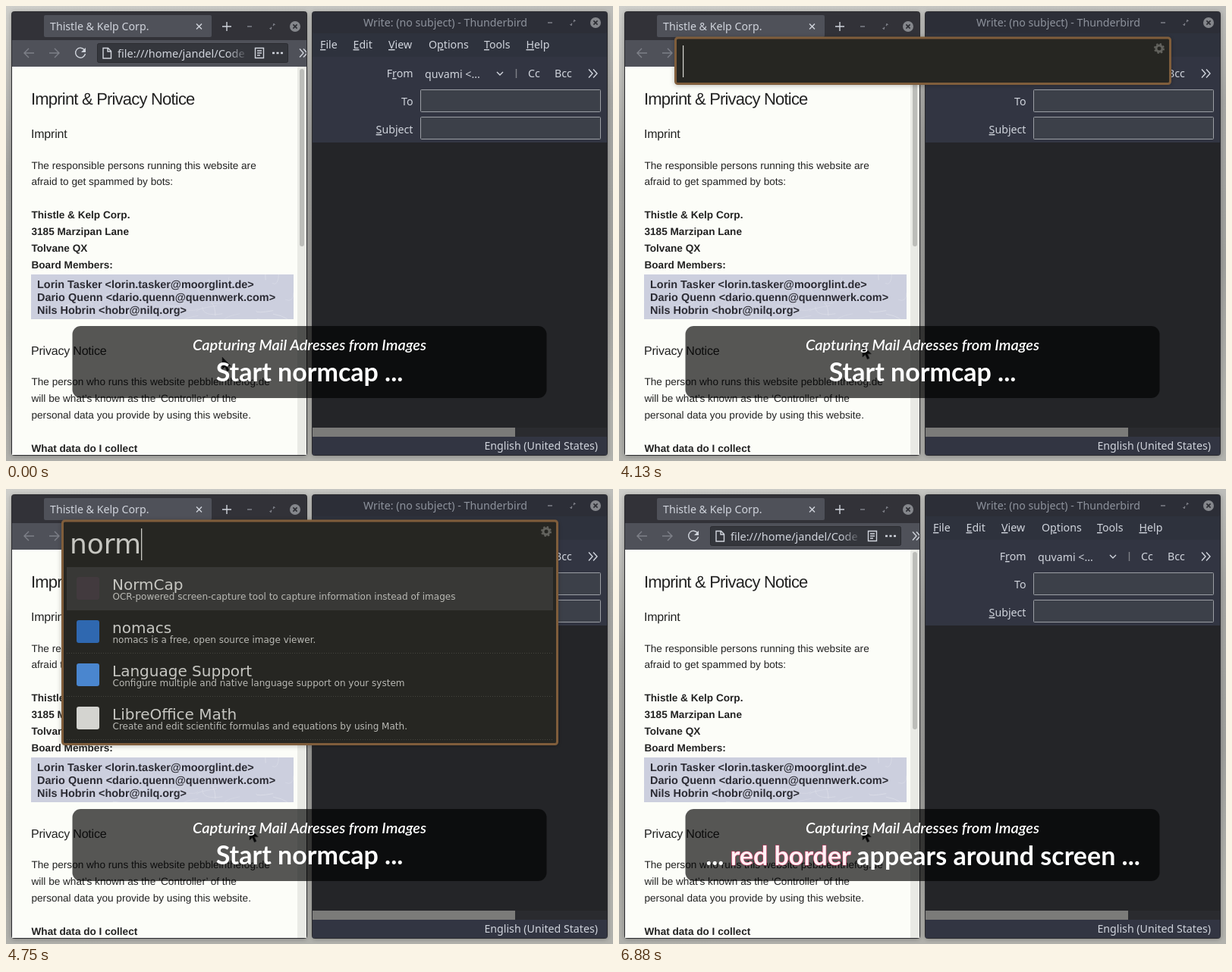
Animation, 800 px wide and 600 px high, one loop 8 s. Source, as an HTML page:

```html
<!DOCTYPE html>
<html lang="en">
<head>
<meta charset="utf-8">
<title>Screen capture demo</title>
<style>
  html, body { margin: 0; width: 100%; height: 100%; overflow: hidden; background: #a9a9a5; }
  svg { display: block; width: 800px; height: 600px; }
  text { white-space: pre; }
  .ui { font: 14.2px "Noto Sans", "Open Sans", sans-serif; fill: #d0d4dc; }
  .page, .scan { font: 13.6px "Liberation Sans", Arial, sans-serif; text-rendering: geometricPrecision; fill: #222; }
  .bold { font-weight: 700; }
  .head { font-size: 16px; letter-spacing: -.2px; }
  .title { font-size: 22px; letter-spacing: -.8px; }
  .scan { font-weight: 700; font-size: 14.45px; fill: #2b2b33; }
  .caption { font-family: Lato, sans-serif; fill: #fff; text-anchor: middle; }
  .small { font-size: 19.9px; font-style: italic; font-weight: 600; }
  .big { font-size: 34px; font-weight: 700; }
  .red { fill: #fff0f4; stroke: #d8426c; stroke-width: 1.2px; paint-order: stroke; }
  .launch { font-family: "DejaVu Sans", Verdana, sans-serif; fill: #c6c6c1; }
  .query { font-size: 36px; }
  .name { font-size: 20px; }
  .info { font-size: 12px; fill: #b9b9b4; }
  .key { text-decoration: underline; }
  .end { text-anchor: end; }
  .line { fill: none; stroke: #d0d4dc; stroke-width: 1.4; }
  .dim { stroke: #7e8088; }
  .window { stroke: #2a2b2e; filter: url(#shadow); }
</style>
</head>
<body>
<svg viewBox="0 0 800 600">
  <defs>
    <linearGradient id="wall" x2=".15" y2="1">
      <stop offset="0" stop-color="#cfcfcb"/><stop offset=".35" stop-color="#a6a6a3"/>
      <stop offset=".7" stop-color="#a0a09d"/><stop offset="1" stop-color="#b2b2ad"/>
    </linearGradient>
    <linearGradient id="fade">
      <stop offset="0" stop-color="#34363c" stop-opacity="0"/><stop offset="1" stop-color="#34363c"/>
    </linearGradient>
    <filter id="shadow" x="-10%" y="-20%" width="120%" height="140%">
      <feDropShadow dx="0" dy="1" stdDeviation="3" flood-opacity=".25"/>
    </filter>
    <clipPath id="browserClip"><rect x="8" y="8" width="388" height="584"/></clipPath>
    <clipPath id="scanClip"><rect x="33" y="354" width="346" height="59"/></clipPath>
    <g id="buttons">
      <path class="line dim" d="M-63 0h6M-33 3v-1M-33 3h2M-27 -3v1M-27 -3h-2M-32 2l1 -1M-28 -2l-1 1"/>
      <circle r="7" fill="#85878c"/>
      <path d="M-2.6 -2.6l5.2 5.2M2.6 -2.6l-5.2 5.2" stroke="#2c2d33" stroke-width="1.6"/>
    </g>
  </defs>

  <rect width="800" height="600" fill="url(#wall)"/>

  <!-- browser -->
  <rect class="window" x="7.5" y="7.5" width="389" height="585" rx="3" fill="#303137"/>
  <g clip-path="url(#browserClip)">
    <rect x="50" y="12" width="221" height="29" rx="2" fill="#4f5159"/>
    <text class="ui" x="58" y="32">Thistle &amp; Kelp Corp.</text>
    <path class="line" d="M251 23.5l7 7M258 23.5l-7 7M285 27h12M291 21v12"/>
    <use href="#buttons" x="381" y="27"/>
    <rect x="8" y="45" width="388" height="35" fill="#4f5159"/>
    <path class="line dim" d="M37 62H24m6 -6l-6 6l6 6M57 62h13m-6 -6l6 6l-6 6"/>
    <path class="line" d="M103.5 58a6.5 6.5 0 1 0 1 5"/>
    <path d="M105 55v6h-6z" fill="#d0d4dc"/>
    <rect x="120.5" y="49.5" width="251" height="25" rx="2" fill="#34363c" stroke="#2a2b30"/>
    <path class="line" d="M128 55.5h6.5l4 4v9.5h-10.5zM134 55.5v4.5h4.5"/>
    <text class="ui" x="147" y="68" style="font-size:14.5px">file:///home/jandel/Code</text>
    <path d="M320 52h8v20h-8z" fill="#34363c"/>
    <rect x="292" y="52" width="28" height="20" fill="url(#fade)"/>
    <path class="line" d="M328.5 55.5h11v13h-11zM331 59h6M331 62h6M331 65h4"/>
    <path d="M351 62h3M356.5 62h3M362 62h3" stroke="#d0d4dc" stroke-width="2.6"/>
    <path class="line" d="M387 56.5l5 5.5l-5 5.5M392 56.5l5 5.5l-5 5.5"/>
    <rect x="8" y="80" width="388" height="512" fill="#fcfdf8"/>
    <rect x="384" y="80" width="12" height="512" fill="#e9eae5"/>
    <rect x="387" y="83" width="6" height="234" rx="3" fill="#bcbdb9"/>
    <g class="page">
      <text class="title" x="33" y="130">Imprint &amp; Privacy Notice</text>
      <text class="head" x="33" y="173.5">Imprint</text>
      <text x="33.5" y="214.5">The responsible persons running this website are</text>
      <text x="33.5" y="236">afraid to get spammed by bots:</text>
      <g class="bold">
        <text x="33.5" y="280">Thistle &amp; Kelp Corp.</text>
        <text x="33.5" y="302">3185 Marzipan Lane</text>
        <text x="33.5" y="324">Tolvane QX</text>
        <text x="33.5" y="346">Board Members:</text>
        <text x="33.5" y="588">What data do I collect</text>
      </g>
      <text class="head" x="33" y="459.5">Privacy Notice</text>
      <text x="33.5" y="500">The person who runs this website pebbleinthefog.de</text>
      <text x="33.5" y="522">will be what’s known as the ‘Controller’ of the</text>
      <text x="33.5" y="544">personal data you provide by using this website.</text>
    </g>
    <rect x="33" y="354" width="346" height="59" fill="#cccfde"/>
    <g id="scratches" clip-path="url(#scanClip)" stroke="#e2e4ec" fill="none"></g>
    <text class="scan" x="41" y="372">Lorin Tasker &lt;lorin.tasker@moorglint.de&gt;</text>
    <text class="scan" x="41" y="389">Dario Quenn &lt;dario.quenn@quennwerk.com&gt;</text>
    <text class="scan" x="41" y="406">Nils Hobrin &lt;hobr@nilq.org&gt;</text>
  </g>

  <!-- mail window -->
  <rect class="window" x="403.5" y="7.5" width="389" height="585" rx="3" fill="#2f323d"/>
  <rect x="404" y="8" width="388" height="28" rx="3" fill="#2c2e37"/>
  <use href="#buttons" x="777" y="22"/>
  <rect x="404" y="67" width="388" height="113" fill="#323542"/>
  <rect x="404" y="180" width="388" height="376" fill="#242528"/>
  <rect x="404" y="556" width="388" height="12" fill="#2a2b2f"/>
  <rect x="404" y="556" width="267" height="12" fill="#7b7b79"/>
  <rect x="404" y="568" width="388" height="24" fill="#323542"/>
  <g fill="#3c4049" stroke="#9b9ea4">
    <rect x="546.5" y="110.5" width="237" height="29" rx="1"/>
    <rect x="546.5" y="146.5" width="237" height="29" rx="1"/>
  </g>
  <g class="ui">
    <text x="471" y="27" fill="#8d929c">Write: (no subject) - Thunderbird</text>
    <text x="414" y="56"><tspan class="key">F</tspan>ile</text>
    <text x="457.5" y="56"><tspan class="key">E</tspan>dit</text>
    <text x="504" y="56"><tspan class="key">V</tspan>iew</text>
    <text x="557" y="56">O<tspan class="key">p</tspan>tions</text>
    <text x="630" y="56"><tspan class="key">T</tspan>ools</text>
    <text x="685.5" y="56"><tspan class="key">H</tspan>elp</text>
    <text class="end" x="536.5" y="94">F<tspan class="key">r</tspan>om</text>
    <text class="end" x="536.5" y="131">To</text>
    <text class="end" x="536.5" y="168"><tspan class="key">S</tspan>ubject</text>
    <text x="552" y="95">quvami &lt;...</text>
    <text x="688" y="94">Cc</text>
    <text x="723" y="94">Bcc</text>
    <text class="end" x="780" y="585">English (United States)</text>
  </g>
  <path class="line" d="M647 87l4 4l4 -4"/>
  <path class="line dim" d="M672.5 83v12"/>
  <path class="line" d="M768 83.5l5 5.5l-5 5.5M774 83.5l5 5.5l-5 5.5"/>

  <path id="pointer" d="M0 0V16l3.7 -3.3l2.6 6l2.7 -1.2l-2.6 -5.7h5z" fill="#151515" stroke="#55565a" stroke-width=".6"/>

  <!-- caption -->
  <rect x="87.5" y="422" width="625" height="95" rx="11" fill="#000" fill-opacity=".66"/>
  <text class="caption small" x="400" y="454">Capturing Mail Adresses from Images</text>
  <text class="caption big" id="start" x="400" y="495">Start normcap ...</text>
  <text class="caption big" id="border" x="400.5" y="496">... <tspan class="red">red border</tspan> appears around screen ...</text>

  <!-- launcher -->
  <g id="launcher">
    <rect id="panel" x="74.5" y="42" width="652" rx="3" fill="#272723" stroke="#7f5d3b" stroke-width="3" filter="url(#shadow)"/>
    <g fill="none" stroke="#62625d">
      <circle cx="712" cy="56" r="4" stroke-width="3"/>
      <circle cx="712" cy="56" r="6" stroke-width="2" stroke-dasharray="2.36"/>
    </g>
    <g id="rows"></g>
    <text class="launch query" id="query" x="84" y="85"></text>
    <rect id="caret" y="52" width="1.2" height="42" fill="#d8d8d2"/>
  </g>
</svg>
<script>
const LOOP = 8000;
const el = id => document.getElementById(id);

function add(parent, tag, attrs, text = "") {
  const node = document.createElementNS("http://www.w3.org/2000/svg", tag);
  for (const key in attrs) node.setAttribute(key, attrs[key]);
  node.textContent = text;
  return parent.appendChild(node);
}

// faint paper scratches, seeded
let seed = 7;
const random = () => (seed = seed * 16807 % 2147483647) / 2147483647;
for (let i = 0; i < 40; i++) {
  const x = 33 + random() * 346, y = 354 + random() * 59;
  const dx = random() * 60 - 30, dy = random() * 40 - 20;
  add(el("scratches"), "path", { d: `M${x} ${y}q${dx} 4 ${dx} ${dy}`, opacity: .25 + random() * .4 });
}

const apps = [
  ["NormCap", "OCR-powered screen-capture tool to capture information instead of images", "#423a3e"],
  ["nomacs", "nomacs is a free, open source image viewer.", "#2f68b0"],
  ["Language Support", "Configure multiple and native language support on your system", "#4a86cf"],
  ["LibreOffice Math", "Create and edit scientific formulas and equations by using Math.", "#d4d4d0"]
];
const ROW = 57;
const rows = apps.map(([name, info, color], i) => {
  const row = add(el("rows"), "g", { transform: `translate(0 ${103 + i * ROW})` });
  if (i === 0) add(row, "rect", { x: 80, width: 641, height: ROW, fill: "#383836" });
  else add(row, "path", { d: "M80 56.5H721", stroke: "#45453f", "stroke-dasharray": "1 2" });
  add(row, "rect", { x: 93, y: 13, width: 30, height: 30, rx: 3, fill: color });
  add(row, "text", { class: "launch name", x: 140, y: 30 }, name);
  add(row, "text", { class: "launch info", x: 140.5, y: 43 }, info);
  return row;
});

// each step: start time, value
const pointerSteps = [[0, [285, 463]], [130, [309, 453]], [250, [321, 447]]];
const opacitySteps = [[0, 0], [2250, .5], [2380, 1], [6500, .6], [6630, .2], [6750, 0]];
const querySteps = [[0, ""], [4250, "n"], [4380, "no"], [4500, "nor"], [4630, "norm"],
  [4880, "normc"], [5130, "normca"], [5380, "normcap"]];
const countSteps = [[0, 0], [4250, 2], [4500, 4], [4880, 1]];
const caretSteps = [[0, 1], [3130, 0], [3500, 1]];
const captionSteps = [[0, "start"], [6130, "border"]];

const at = (steps, t) => steps.findLast(([start]) => start <= t)[1];
const show = (node, on) => node.setAttribute("visibility", on ? "inherit" : "hidden");

function draw(t) {
  el("pointer").setAttribute("transform", `translate(${at(pointerSteps, t)})`);

  const caption = at(captionSteps, t);
  for (const id of ["start", "border"]) show(el(id), id === caption);

  const count = at(countSteps, t);
  rows.forEach((row, i) => show(row, i < count));
  el("panel").setAttribute("height", count ? 66.5 + count * ROW : 60.5);

  const query = el("query");
  query.textContent = at(querySteps, t);
  el("caret").setAttribute("x", 84 + query.getComputedTextLength());
  show(el("caret"), at(caretSteps, t));
  el("launcher").setAttribute("opacity", at(opacitySteps, t));
}

function tick() {
  draw(performance.now() % LOOP);
  requestAnimationFrame(tick);
}
tick();
</script>
</body>
</html>
```
